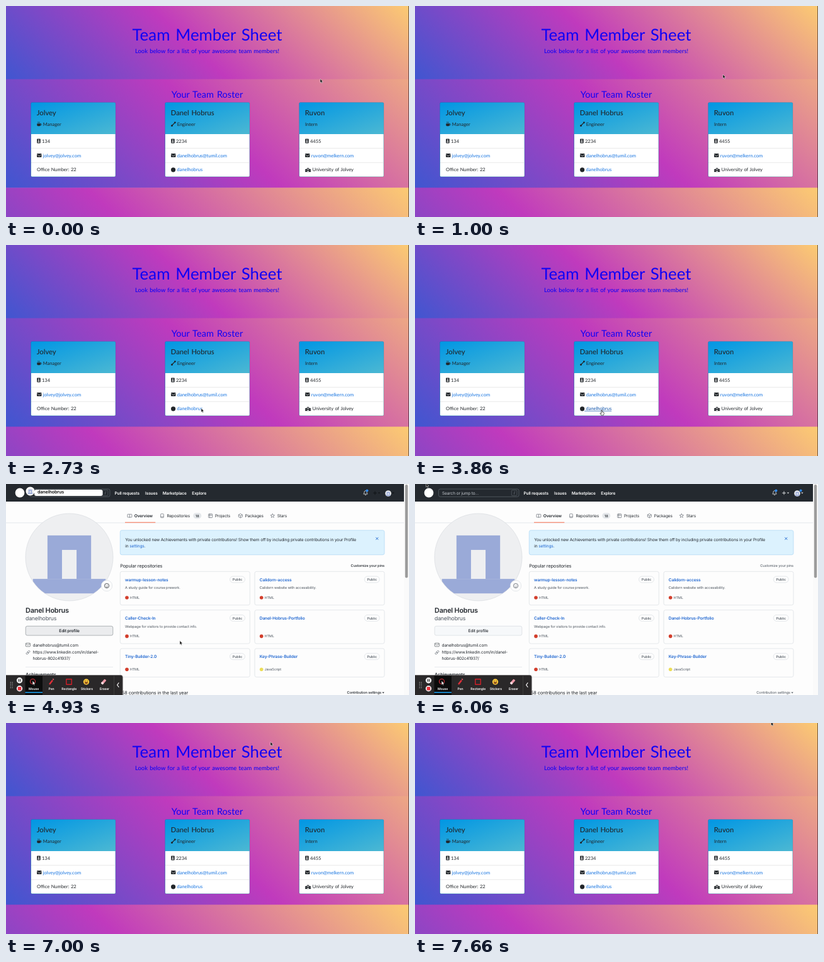
Write an HTML page with a canvas that moves like this. It is 640 px wide and 336 px high and loops after 7.86 s.

```html
<!DOCTYPE html>
<html lang="en">
<head>
<meta charset="utf-8">
<title>Team Member Sheet</title>
<style>
html, body { margin: 0; width: 100%; height: 100%; overflow: hidden; }
canvas { display: block; width: 640px; height: 336px; }
</style>
</head>
<body>
<canvas id="stage"></canvas>
<script>
const W = 640, H = 336, LOOP = 7860;
const canvas = document.getElementById('stage');
const g = canvas.getContext('2d');
const dpr = window.devicePixelRatio || 1;
canvas.width = W * dpr;
canvas.height = H * dpr;
g.textRendering = 'geometricPrecision';

const INK = '#212529', LINK = '#1573e0', BLUE = '#1f66d0', GREY = '#4f5760', LINE = '#d3d8de';
const PAGE = '#fdfdfd';
const USER = 'danelhobrus', NAME = 'Danel Hobrus', MAIL = USER + '@tumil.com';

// ---------- helpers ----------
const lato = (size, weight = 400) => ({
  font: `${weight} ${size}px Lato, "Open Sans", sans-serif`, ls: 0, ws: size * 0.085
});
const inter = (size, weight = 400) => ({
  font: `${weight} ${size}px Inter, "Liberation Sans", sans-serif`, ls: -size * 0.02, ws: 0
});

function text(s, x, y, style, color, align = 'left') {
  g.font = style.font;
  g.letterSpacing = style.ls + 'px';
  g.wordSpacing = style.ws + 'px';
  g.textAlign = align;
  g.fillStyle = color;
  g.fillText(s, x, y);
  return g.measureText(s).width;
}

function rect(x, y, w, h, color) {
  g.fillStyle = color;
  g.fillRect(x, y, w, h);
}

function box(x, y, w, h, r, fill, stroke, lw = 0.6) {
  g.beginPath();
  g.roundRect(x, y, w, h, r);
  paint(fill, stroke, lw);
}

function disc(x, y, r, fill, stroke, lw = 0.6) {
  g.beginPath();
  g.arc(x, y, r, 0, 7);
  paint(fill, stroke, lw);
}

function poly(points, fill, stroke, lw, closed = true) {
  g.beginPath();
  for (let i = 0; i < points.length; i += 2) g.lineTo(points[i], points[i + 1]);
  if (closed) g.closePath();
  paint(fill, stroke, lw);
}

function paint(fill, stroke, lw) {
  if (fill) { g.fillStyle = fill; g.fill(); }
  if (stroke) { g.strokeStyle = stroke; g.lineWidth = lw; g.stroke(); }
}

const line = (points, color, lw) => poly(points, null, color, lw, false);

function at(x, y, draw) {
  g.save();
  g.translate(x, y);
  draw();
  g.restore();
}

// CSS-style angled gradient over a box
function angled(x, y, w, h, deg, stops) {
  const a = deg * Math.PI / 180, sx = Math.sin(a), sy = -Math.cos(a);
  const half = (Math.abs(w * sx) + Math.abs(h * sy)) / 2;
  const cx = x + w / 2, cy = y + h / 2;
  const grad = g.createLinearGradient(cx - sx * half, cy - sy * half, cx + sx * half, cy + sy * half);
  stops.forEach(([p, c]) => grad.addColorStop(p, c));
  return grad;
}

// ---------- roster page ----------
const SUNSET = [[0, '#4056d0'], [0.46, '#c03abd'], [1, '#fccb72']];
const SEA = [[0, '#0096e4'], [1, '#80d0c7']];

// each icon is drawn from its left edge, centred on y = 0; w is its advance
const icons = {
  mug: { w: 9.7, draw() {
    box(0.3, -0.8, 5.4, 4, [0, 0, 1.4, 1.4], INK);
    disc(5.9, 0.7, 1.3, null, INK, 0.8);
    line([1.8, -3.6, 2.2, -1.4], INK, 0.8);
    line([3.8, -3.6, 4.2, -1.4], INK, 0.8);
  } },
  tool: { w: 9.7, draw() {
    line([1, 3, 6.6, -2.6], INK, 1.3);
    disc(1.5, 2.4, 1.5, INK);
    disc(6.4, -2.4, 1.4, INK);
  } },
  badge: { w: 8, draw() {
    box(0.2, -3.6, 5.5, 7.2, 0.8, INK);
    disc(2.9, -0.6, 1, '#fff');
    box(1.3, 0.9, 3.2, 1.4, 0.7, '#fff');
    rect(2, -2.9, 1.8, 0.5, '#fff');
  } },
  mail: { w: 9.7, draw() {
    box(0, -2.8, 7.5, 5.6, 0.8, INK);
    line([0.1, -1.5, 3.75, 1, 7.4, -1.5], '#fff', 0.6);
  } },
  mark: { w: 9.5, draw() { disc(3.6, 0, 3.6, INK); } },
  school: { w: 11.6, draw() {
    rect(0, -1, 9.2, 4.4, INK);
    poly([1.9, -1, 4.6, -3.4, 7.3, -1], INK);
    disc(4.6, -0.6, 0.9, '#fff');
    rect(3.8, 1.3, 1.6, 2.1, '#fff');
    [0.8, 7.5].forEach(x => rect(x, 0.4, 0.9, 1.2, '#fff'));
  } }
};

const team = [
  { x: 39.5, name: 'Jolvey', role: ['mug', 'Manager'],
    rows: [['badge', '134'], ['mail', 'jolvey@jolvey.com', true], [null, 'Office Number: 22']] },
  { x: 252.5, name: NAME, role: ['tool', 'Engineer'],
    rows: [['badge', '2234'], ['mail', MAIL, true], ['mark', USER, true]] },
  { x: 465.5, name: 'Ruvon', role: [null, 'Intern'],
    rows: [['badge', '4455'], ['mail', 'ruvon@melkern.com', true], ['school', 'University of Jolvey']] }
];

function label([icon, s, link], x, y, showIcons, hover) {
  const used = showIcons && icon ? icons[icon] : null;
  if (used) at(x, y, used.draw);
  const tx = x + (used ? used.w : 0);
  const w = text(s, tx, y + 2.6, lato(7.5), hover ? '#0a4fa8' : link ? LINK : INK);
  if (hover) rect(tx - 2.4, y + 3.4, w + 2.4, 0.6, '#0a4fa8');
}

function memberCard(m, showIcons, hover) {
  const y = 153.5, w = 134.5, h = 118.5;
  box(m.x, y, w, h, 2, angled(m.x, y, w, h, 160, SEA), 'rgba(0,0,0,.16)', 0.5);
  box(m.x + 0.5, 204, w - 1, 67.5, [0, 0, 1.6, 1.6], '#fff');
  text(m.name, m.x + 9.3, 174, lato(11.2, 500), INK);
  label(m.role, m.x + 9.5, 188, showIcons);
  m.rows.forEach((row, i) => {
    if (i) rect(m.x + 0.5, 203.7 + i * 22.8, w - 1, 0.5, '#d5d5d5');
    label(row, m.x + 9.5, 215 + i * 22.9, showIcons, hover && row[0] === 'mark');
  });
}

function rosterPage(showIcons, hover) {
  rect(0, 0, W, 289.5, angled(0, 0, W, 289.5, 43, SUNSET));
  rect(0, 289.5, W, 47, angled(0, 289.5, W, 289.5, 43, SUNSET));
  rect(0, 0, W, 116.5, angled(0, 0, W, 116.5, 43, SUNSET));
  const blue = '#1002f6';
  text('Team Member Sheet', 319.5, 55, lato(25.9), blue, 'center');
  text('Look below for a list of your awesome team members!', 319.5, 75.2, lato(9.4, 500), blue, 'center');
  text('Your Team Roster', 319.5, 146, lato(14.6), blue, 'center');
  team.forEach(m => memberCard(m, showIcons, hover));
  rect(639, 0, 1, H, 'rgba(20,15,30,.6)');
}

// ---------- profile page ----------
const repos = [
  ['warmup-lesson-notes', 'A study guide for course prework.'],
  ['Calidorn-access', 'Calidorn website with accessibility.'],
  ['Caller-Check-In', 'Webpage for visitors to provide contact info.'],
  ['Danel-Hobrus-Portfolio', ''],
  ['Tiny-Builder-2.0', ''],
  ['Key-Phrase-Builder', '', 'JavaScript']
];

// five-cell pixel avatar clipped to a circle
function avatar(cx, cy, r, cell) {
  g.save();
  disc(cx, cy, r, '#eeeff1');
  g.clip();
  const x = cx - 2.5 * cell, y = cy - 2.5 * cell, c = '#9aaad8';
  rect(x + cell, y + cell, 3 * cell, 3 * cell, c);
  rect(x + 2 * cell, y + 2 * cell, cell, 2 * cell, '#eeeff1');
  rect(x, y + 4 * cell, 5 * cell, cell, c);
  g.restore();
}

function caret(x, y, color) {
  poly([x, y, x + 3.4, y, x + 1.7, y + 2], color);
}

function header(loading) {
  rect(0, 0, 632, 28, '#24292f');
  disc(22, 14, 7.4, '#fff');
  box(37.5, 8, 127.5, 12.3, 2.6, '#24292f', '#6a727b');
  box(153.3, 9.8, 8.6, 8.8, 1.4, null, '#6a727b', 0.5);
  text('/', 157.6, 16.4, inter(5.5), '#9aa1a9', 'center');
  if (loading) {
    box(45, 9, 108.5, 10, 3, '#fff');
    disc(38.5, 11.5, 7, '#fff');
    avatar(38.5, 11.5, 5.4, 1.8);
    text(USER, 50, 14.8, inter(7.2, 600), '#111');
  } else {
    text('Search or jump to...', 43, 16.6, inter(6.55), '#c3c8cd');
  }
  [['Pull requests', 172.5], ['Issues', 221], ['Marketplace', 248.7], ['Explore', 295.3]]
    .forEach(([s, x]) => text(s, x, 16.6, inter(6.55, 600), '#fff'));
  poly([567.8, 16, 568.8, 14.4, 569, 12, 571, 10.4, 573, 12, 573.2, 14.4, 574.2, 16], null, '#e6e8ea', 0.8);
  line([570.2, 17.5, 571.8, 17.5], '#e6e8ea', 0.9);
  disc(573.4, 10.6, 2.1, '#2f86e8');
  const soft = loading ? '#0f1215' : '#e6e8ea';
  line([583.2, 14.3, 588.8, 14.3], soft, 0.9);
  line([586, 11.5, 586, 17.1], soft, 0.9);
  caret(590.8, 13.6, soft);
  avatar(607, 15, 4.8, 1.7);
  caret(613.2, 13.6, soft);
  if (!loading) disc(612.6, 10.4, 2, '#2f86e8');
}

function tabIcon(kind, x, y) {
  if (kind === 0) {
    box(x - 3.4, y - 2.4, 6.8, 4.8, 0.4, null, GREY);
    line([x, y - 2.2, x, y + 3], GREY, 0.6);
  } else if (kind === 1) {
    box(x - 2.4, y - 3, 4.8, 6, 0.8, null, GREY);
    line([x - 2.4, y + 1.4, x + 2.4, y + 1.4], GREY, 0.6);
  } else if (kind === 2) {
    box(x - 3, y - 3, 6, 6, 0.6, null, GREY);
    line([x - 3, y - 1, x + 3, y - 1], GREY, 0.6);
    line([x - 1, y - 3, x - 1, y + 3], GREY, 0.6);
  } else if (kind === 3) {
    poly([x, y - 3.3, x + 3, y - 1.6, x + 3, y + 1.7, x, y + 3.3, x - 3, y + 1.7, x - 3, y - 1.6], null, GREY, 0.6);
    line([x - 3, y - 1.6, x, y, x + 3, y - 1.6], GREY, 0.6);
    line([x, y, x, y + 3.3], GREY, 0.6);
  } else {
    const pts = [];
    for (let i = 0; i < 10; i++) {
      const r = i % 2 ? 1.5 : 3.4, a = i * Math.PI / 5;
      pts.push(x + r * Math.sin(a), y - r * Math.cos(a));
    }
    poly(pts, null, GREY, 0.6);
  }
}

function tabs() {
  rect(0, 61.6, 632, 0.6, LINE);
  ['Overview', 'Repositories', 'Projects', 'Packages', 'Stars'].forEach((s, i) => {
    const x = [203.8, 255.4, 332, 379.7, 430.7][i];
    tabIcon(i, x - 7.4, 50.6);
    text(s, x, 53, inter(6.55, i ? 400 : 600), '#24292f');
  });
  box(297.3, 46, 13, 9.2, 4.6, '#e4e7ea');
  text('18', 303.8, 52.7, inter(5.5, 500), '#24292f', 'center');
  rect(189, 60.6, 48.3, 1.3, '#f58a70');
}

function sidebar(loading) {
  const ink = loading ? '#24292f' : GREY;
  avatar(100.5, 116.5, 69.5, 23.1);
  disc(100.5, 116.5, 69.5, null, '#d3d7dc');
  disc(160, 162, 8.7, PAGE, LINE);
  disc(160, 162, 3.7, null, ink, 0.7);
  disc(158.7, 161, 0.5, ink);
  disc(161.3, 161, 0.5, ink);
  g.beginPath();
  g.arc(160, 162.4, 1.8, 0.3, 2.8);
  paint(null, ink, 0.6);

  text(NAME, 31, 205, inter(10.9, 600), '#24292f');
  text(USER, 31, 216.6, inter(8.7), GREY);
  box(31.2, 226.3, 138.6, 14.8, 2.6, loading ? '#ebecee' : '#f6f8fa', loading ? '#80868c' : '#cfd3d8');
  text('Edit profile', 100.5, 236.2, inter(6.5, loading ? 600 : 500), '#24292f', 'center');

  box(31.4, 253.4, 7, 5.4, 0.8, null, '#3a4046');
  line([31.6, 254.4, 34.9, 256.6, 38.2, 254.4], '#3a4046', 0.6);
  text(MAIL, 42.5, 258.6, inter(6.55), '#24292f');
  at(35, 268.3, () => {
    g.rotate(-0.75);
    box(-3.6, -1.3, 4, 2.6, 1.3, null, GREY);
    box(-0.4, -1.3, 4, 2.6, 1.3, null, GREY);
  });
  text('https://www.linkedin.com/in/danel-', 42.5, 270.3, inter(6.55), '#24292f');
  text('hobrus-802c41937/', 42.5, 280, inter(6.55), '#24292f');
  rect(31, 291.5, 139, 0.5, LINE);
  text('Achievements', 31, 306, inter(7.3, 600), '#24292f');
}

function repoCard([name, desc, lang = 'HTML'], i) {
  const row = i >> 1, x = i % 2 ? 395 : 181.3, y = [139.3, 200.7, 262][row];
  box(x, y, 206, row < 2 ? 53.5 : 45.4, 2.8, PAGE, LINE);
  text(name, x + 7.8, y + 15.3, inter(6.6, 600), BLUE);
  box(x + 174.2, y + 7.7, 24, 10, 5, null, LINE);
  text('Public', x + 186.2, y + 14.8, inter(5.5, 500), GREY, 'center');
  text(desc, x + 7.8, y + 27.8, inter(5.7), GREY);
  const ly = y + (row < 2 ? 41.7 : 33.3);
  disc(x + 10.7, ly, 2.8, lang === 'HTML' ? '#d23d2b' : '#ecdd58');
  text(lang, x + 15.4, ly + 2, inter(5.5), GREY);
}

function recorder() {
  box(-3, 304.5, 188.2, 34, [0, 3, 0, 0], '#2a2829', '#6c6a6b', 0.9);
  rect(30.5, 305.5, 27.5, 31, '#0c0c0c');
  rect(30.5, 331, 27.5, 1.7, '#1c96e0');
  for (let i = 0; i < 8; i++) disc(7.3 + (i % 2) * 2.8, 316 + (i >> 1) * 2.8, 0.7, '#b5b5b5');
  disc(21.5, 312.7, 4.7, '#ececec');
  rect(19.7, 310.7, 1.2, 4, '#2a2829');
  rect(22.1, 310.7, 1.2, 4, '#2a2829');
  disc(21.5, 325.8, 4.7, '#ececec');
  box(18.8, 323.1, 5.4, 5.4, 0.8, '#e8323c');
  ['Mouse', 'Pen', 'Rectangle', 'Stickers', 'Eraser'].forEach((s, i) =>
    text(s, 44 + i * 28.1, 327.8, inter(5.1, 600), '#fff', 'center'));
  disc(42.5, 314.5, 4, null, '#e0303a', 1.1);
  arrow(42.2, 313.5, '#fff', '#262626');
  line([69, 319, 74, 312.5], '#e0303a', 2.4);
  line([74.6, 311.6, 75.6, 310.4], '#f06a70', 2.2);
  box(95.8, 310.8, 8.4, 8.4, 0.3, null, '#d01f28', 1.4);
  disc(127.5, 315, 4.7, '#f7c53c');
  disc(125.8, 313.8, 0.7, '#5a3a10');
  disc(129.2, 313.8, 0.7, '#5a3a10');
  g.beginPath();
  g.arc(127.5, 315.4, 2.6, 0, Math.PI);
  paint('#7a3a18');
  at(155, 315, () => {
    g.rotate(-0.85);
    box(-4.5, -1.9, 9, 3.8, 0.8, '#f09aa8');
    box(-4.5, -1.9, 3.2, 3.8, 0.8, '#fbdde2');
  });
  rect(171.3, 305.5, 0.6, 31, '#4a4a4a');
  line([179.3, 316.4, 176.6, 320, 179.3, 323.6], '#fff', 1.1);
}

function profilePage(loading) {
  rect(0, 0, W, H, PAGE);
  header(loading);
  tabs();
  sidebar(loading);

  box(181.3, 73.7, 419.7, 39, 2.8, '#dcf2fe', '#a5d2f4');
  const body = inter(6.58);
  text('You unlocked new Achievements with private contributions! Show them off by including private contributions in your Profile',
    189.2, 91, body, '#24292f');
  let x = 189.2;
  [['in ', '#24292f'], ['settings', BLUE], ['.', '#24292f']]
    .forEach(([s, color]) => { x += text(s, x, 101, body, color); });
  line([587.3, 84.9, 591.3, 88.9], BLUE, 0.9);
  line([591.3, 84.9, 587.3, 88.9], BLUE, 0.9);

  const side = inter(5.7, loading ? 500 : 400), sideInk = loading ? '#24292f' : GREY;
  text('Popular repositories', 181.2, 132.7, inter(7.4), '#24292f');
  text('Customize your pins', 601, 132.3, side, sideInk, 'right');
  repos.forEach(repoCard);
  text('158 contributions in the last year', 181.2, 334.6, inter(7.4), '#24292f');
  text('Contribution settings', 596, 334.2, side, sideInk, 'right');
  caret(597.4, 331.4, sideInk);

  rect(632, 0, 8, H, '#fafafa');
  box(633.8, 1, 4.4, 148.5, 2.2, '#9c9c9c');
  recorder();
}

// ---------- pointer ----------
function arrow(x, y, fill = '#111', edge = '#f4f4f4') {
  at(x, y, () => poly([0, 0, 0, 6.2, 1.4, 5, 2.4, 7.1, 3.4, 6.7, 2.5, 4.6, 4.3, 4.5], fill, edge, 0.5));
}

function hand(x, y) {
  at(x, y, () => poly([-1, -4, 0.2, -4, 0.3, -1.2, 3, -0.5, 3.2, 1.8, 2.3, 4, -1.2, 4, -3.2, 1, -2.4, 0.4, -1, 1.4],
    '#fff', '#222', 0.7));
}

// pointer tip held from each time on: [ms, x, y]
const path = [
  [0, 499, 116], [1000, 489, 109], [2000, 473, 101], [2130, 455, 118], [2330, 400, 186],
  [2530, 342, 238], [2730, 310, 260], [2860, 297, 267],
  [4930, 276, 249.5], [5200, 252, 232], [5460, 190, 178], [5600, 122, 118], [5660, 72, 66],
  [5800, 24, 3], [6000, 19, 0], [6060, 17.5, -1.5], [6460, 24, 1], [6600, 150, 50],
  [6860, 330, 62], [7000, 420, 30], [7060, 450, 12], [7200, 515, 3], [7460, 552, 0], [7660, 565.5, -2]
];

function render(t) {
  g.setTransform(dpr, 0, 0, dpr, 0, 0);
  const hover = t >= 2860 && t < 4930;
  if (t >= 4930 && t < 6330) profilePage(t < 5200);
  else rosterPage(t < 6330 || t >= 6460, hover);
  const [, x, y] = path.findLast(p => p[0] <= t);
  if (hover) hand(x, y);
  else arrow(x, y);
}

const start = performance.now();
function tick() {
  render((performance.now() - start) % LOOP);
  requestAnimationFrame(tick);
}
tick();
</script>
</body>
</html>
```
